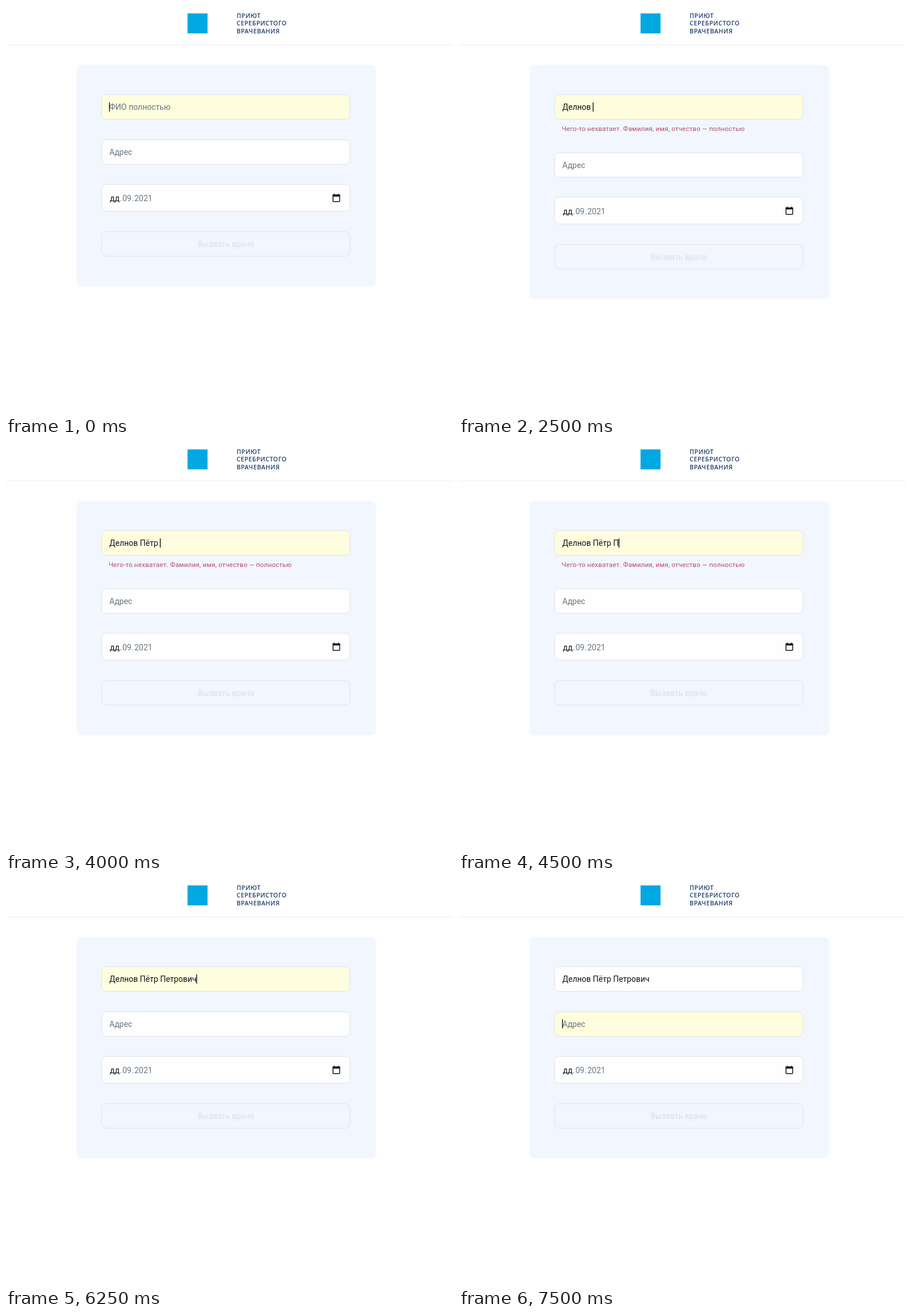
An HTML page for the animation above (8000 ms loop, 783 px wide and 715 px high).

```html
<!DOCTYPE html>
<html lang="ru">
<head>
<meta charset="utf-8">
<style>
html, body { margin: 0; width: 783px; height: 715px; overflow: hidden; background: #fefefe; }
svg { display: block; }
text { font: 14px Roboto, sans-serif; fill: #10141c; white-space: pre; }
.hint { fill: #687582; }
.brand text { font: 600 10.6px "Open Sans", sans-serif; letter-spacing: .55px; fill: #1c3c6c; }
.error { font-size: 11.6px; letter-spacing: .17px; fill: #b54b66; }
.off { fill: #dcdfe4; text-anchor: middle; }
.field { fill: #fefefe; stroke: #dfe2e8; }
.focus { fill: #fefddd; }
.ghost { fill: none; }
</style>
</head>
<body>
<svg width="783" height="715" viewBox="0 0 783 715">
  <rect width="783" height="68" fill="#fff"/>
  <rect y="67.5" width="783" height="1" fill="#eff0f2"/>
  <rect x="318" y="13" width="35" height="35" fill="#00a8e1"/>
  <g class="brand">
    <text x="404" y="20.8">ПРИЮТ</text>
    <text x="404" y="34.3">СЕРЕБРИСТОГО</text>
    <text x="404" y="47.8">ВРАЧЕВАНИЯ</text>
  </g>
  <rect id="panel" x="124" y="103.5" width="524" rx="8" fill="#f1f6ff"/>
  <rect id="nameBox" class="field" x="167.5" y="155.5" width="435" height="43" rx="8"/>
  <text id="name" x="181" y="182.3"></text>
  <text id="error" class="error" x="180" y="218.8">Чего-то нехватает. Фамилия, имя, отчество — полностью</text>
  <g id="lower">
    <rect id="addrBox" class="field" x="167.5" y="234.5" width="435" height="43" rx="8"/>
    <text class="hint" x="181" y="261">Адрес</text>
    <rect class="field" x="167.5" y="312.5" width="435" height="47" rx="8"/>
    <text x="182" y="342">дд</text>
    <text class="hint" x="199.5" y="342">.</text>
    <text class="hint" x="204" y="342">09</text>
    <text class="hint" x="220.5" y="342">.</text>
    <text class="hint" x="225" y="342">2021</text>
    <rect x="572.7" y="331.2" width="11.8" height="11.6" rx="1" fill="none" stroke="#10141c" stroke-width="1.5"/>
    <path d="M572 330.5h13.2v3.6H572zM574 329h1.6v2H574zM581.6 329h1.6v2h-1.6z" fill="#10141c"/>
    <rect class="field ghost" x="167.5" y="395.5" width="435" height="43" rx="8"/>
    <text class="off" x="385" y="422">Вызвать врача</text>
  </g>
  <rect id="caret" width="1.4" height="16" fill="#10141c"/>
</svg>
<script>
const LOOP = 8000, SHIFT = 22.5;
const FULL_NAME = "Делнов Пётр Петрович";
const $ = id => document.getElementById(id);

// [time, letters typed]
const typing = [
  [0, 0], [1500, 2], [1750, 4], [2000, 6], [2500, 7], [3250, 8], [3500, 10],
  [4000, 12], [4500, 13], [4750, 14], [5000, 17], [5250, 18], [5500, 19], [5750, 20]
];
// spans in which the caret is hidden
const hidden = [[750, 1500], [2750, 3250], [4250, 4500], [6500, 7000]];
const ERROR = [1500, 4750], NEXT_FIELD = 7250;

const within = (t, [from, to]) => t >= from && t < to;

function draw(t) {
  const count = typing.filter(step => step[0] <= t).pop()[1];
  const invalid = within(t, ERROR), onAddress = t >= NEXT_FIELD;
  const shift = invalid ? SHIFT : 0;
  const name = $("name");

  name.textContent = count ? FULL_NAME.slice(0, count) : "ФИО полностью";
  name.classList.toggle("hint", !count);
  $("error").style.display = invalid ? "" : "none";
  $("panel").setAttribute("height", 387.5 + shift);
  $("lower").setAttribute("transform", `translate(0 ${shift})`);
  $("nameBox").classList.toggle("focus", !onAddress);
  $("addrBox").classList.toggle("focus", onAddress);

  const typed = count && !onAddress ? name.getComputedTextLength() : 0;
  const caret = $("caret");
  caret.setAttribute("x", 180.6 + typed);
  caret.setAttribute("y", onAddress ? 247.5 : 169);
  caret.style.display = hidden.some(span => within(t, span)) ? "none" : "";
}

const start = performance.now();
function tick() {
  draw((performance.now() - start) % LOOP);
  requestAnimationFrame(tick);
}
tick();
</script>
</body>
</html>
```
